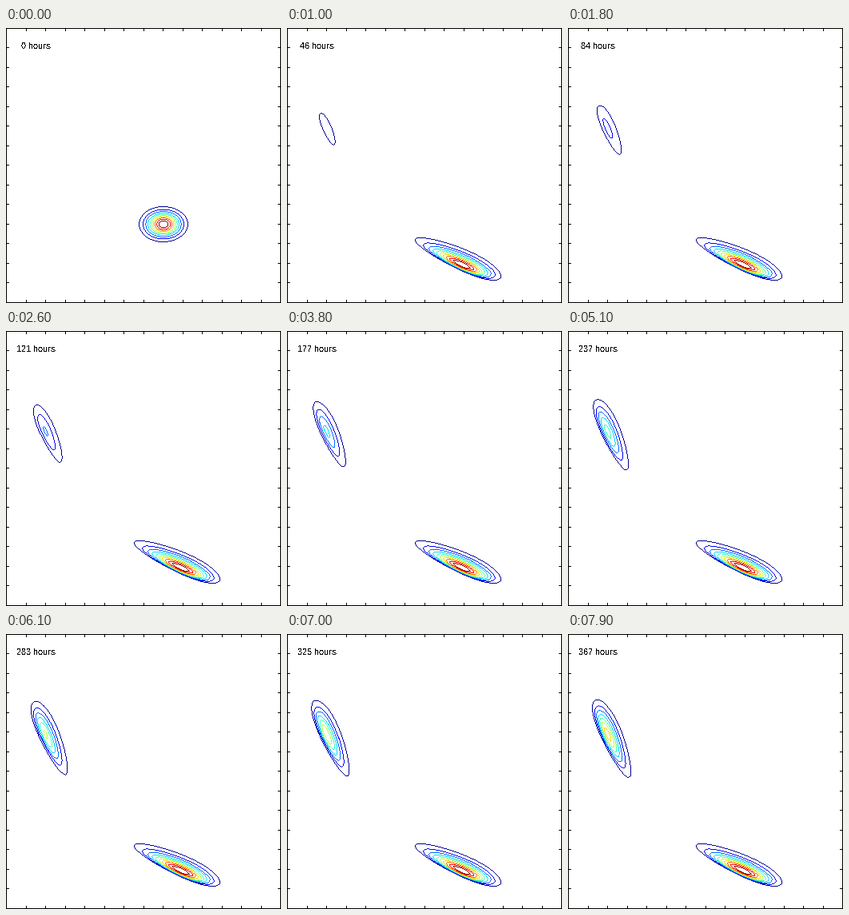
Animation, 344 px wide and 344 px high, one loop 8 s. Source, as a matplotlib script:

```python
import numpy as np
import matplotlib.pyplot as plt
from matplotlib.animation import FuncAnimation

SIZE, DPI = 344, 100
FRAMES, STEP_MS = 80, 100
HOURS_PER_FRAME = 4.6452
LEVELS = 10

plt.rcParams.update({"text.antialiased": False, "text.hinting": "native",
                     "text.hinting_factor": 1})

theta = np.linspace(0, 2 * np.pi, 361)
C, S = np.cos(theta), np.sin(theta)

# Rows of (x, y): peak, long axis, short axis, shift, taper.
# Axes are those of the outermost ring of the settled size.
START = np.array([(196.5, 245), (30.5, 0), (0, 22), (0, 0), (0, 0)])
SETTLED = np.array([(218.5, 295.5), (53.5, 22.5), (0, 14), (-5, -8.3), (0, 2.8)])
SECOND = np.array([(49, 125), (19.6, 48.5), (13.9, 0), (6.7, 5.2), (-3.5, 0)])


def jet(v):
    v = 0.016 + 0.97 * v
    return [np.clip(1.5 - abs(4 * v - k), 0, 1) for k in (3, 2, 1)]


COLORS = [jet(j / (LEVELS - 1)) for j in range(LEVELS)]


def spread(log_ratio):
    return np.sqrt(log_ratio * (1 + 0.03 * log_ratio))


def ring(shape, r):
    """Tapered ellipse whose center drifts away from the peak as it grows."""
    peak, along, across, shift, taper = shape[:, :, None]
    return peak + r * (along * C + across * S) + r * r * (shift + taper * C * S)


def trace(canvas, points, color):
    """Draw a closed curve one pixel wide, without smoothing."""
    steps = np.abs(np.diff(points, axis=1)).max(axis=0)
    dist = np.concatenate([[0], np.cumsum(steps)])
    at = np.linspace(0, dist[-1], int(np.ceil(dist[-1])) + 1)
    x, y = (np.rint(np.interp(at, dist, p)).astype(int) for p in points)
    canvas[y, x] = color


def draw_peak(canvas, shape, height, full):
    for level, color in enumerate(COLORS, 1):
        if height > level:
            r = spread(np.log(height / level)) / spread(np.log(full))
            trace(canvas, ring(shape, r), color)


def second_height(hours):
    return 0.28 + 17.1 * (1 - np.exp(-hours / 673))


def make_box():
    box = np.ones((SIZE, SIZE, 3))
    box[[0, -1]] = 0
    box[:, [0, -1]] = 0
    for k in range(1, 14):
        col, row = int(24.5 * k + 0.5), int(24.5 * k)
        box[:4, col] = box[-4:, col] = 0
        box[row, :4] = box[row, -4:] = 0
    return box


BOX = make_box()
FULL_SECOND = second_height(HOURS_PER_FRAME * (FRAMES - 1))

fig = plt.figure(figsize=(SIZE / DPI, SIZE / DPI), dpi=DPI, facecolor="white")
ax = fig.add_axes([0, 0, 1, 1])
ax.axis("off")
image = ax.imshow(BOX, interpolation="nearest", aspect="auto")
label = ax.text(0, 25.5, "", ha="left", va="baseline", color="black",
                family="Liberation Sans", fontsize=11 * 72 / DPI)


def update(frame):
    hours = HOURS_PER_FRAME * frame
    canvas = BOX.copy()
    settled = 1 - np.exp(-hours / 5)
    draw_peak(canvas, START + (SETTLED - START) * settled,
              LEVELS + 1, LEVELS + 1)
    draw_peak(canvas, SECOND, second_height(hours), FULL_SECOND)
    image.set_data(canvas)

    count = str(round(hours))
    label.set_text(f"{count} hours")
    label.set_x(21.5 - 3 * len(count))
    return image, label


anim = FuncAnimation(fig, update, frames=FRAMES, interval=STEP_MS,
                     init_func=lambda: update(0), repeat=True,
                     repeat_delay=0, blit=False)
plt.show()
```
